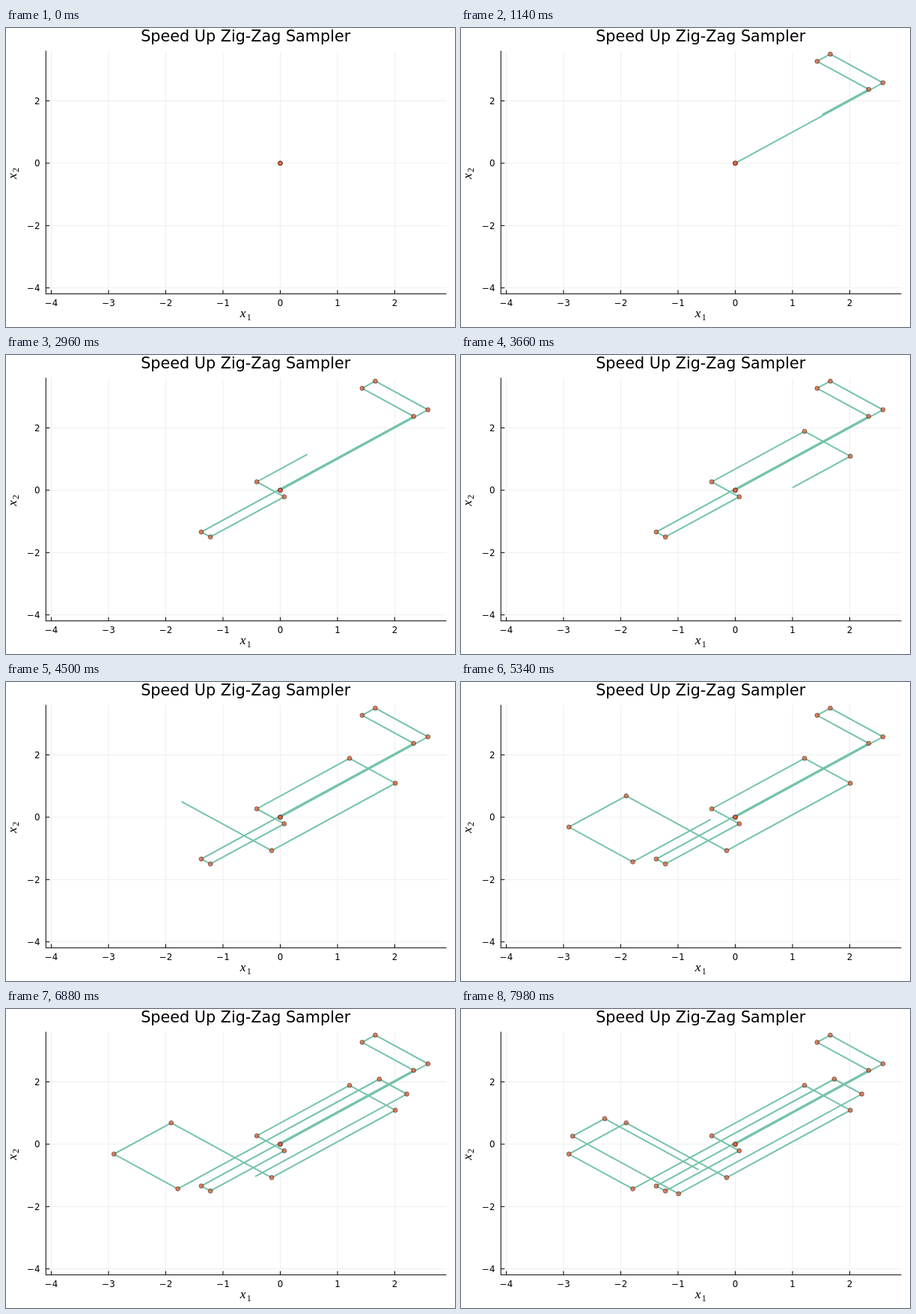
An HTML page with a canvas for the animation above (8000 ms loop, 600 px wide and 400 px high).

```html
<!DOCTYPE html>
<html lang="en">
<head>
<meta charset="utf-8">
<title>Zig-zag sampler</title>
<style>
html, body { margin: 0; width: 100%; height: 100%; overflow: hidden; background: #fff; }
canvas { display: block; }
</style>
</head>
<body>
<canvas id="stage" width="600" height="400"></canvas>
<script>
const ctx = document.getElementById('stage').getContext('2d');
const LOOP = 8000;
const TIME_PER_STEP = 0.0994;
const SANS = '"DejaVu Sans", sans-serif';
const MATH = '"Liberation Serif", serif';
const LEFT = 53.3, RIGHT = 588.5, TOP = 31, BOTTOM = 355.7;
const toX = u => 366.5 + 76.5 * u;
const toY = v => 180.9 - 41.7 * v;

// Signed run lengths, alternately along the rising and the falling diagonal.
const runs = [2.58, -0.92, -0.23, 0.9, -3.71, 0.16, 1.29, -0.48, 1.62, 0.8,
  -2.16, -1.755, -1, 1.115, 3.52, 0.48, -3.2, -1.85, 0.56, 1.8];

// The sampler moves at speed sqrt(1 + |x|^2), so each run's duration is an asinh difference.
function buildTurns() {
  const pos = [0, 0];
  let time = 0;
  const turn = () => ({ time, x: toX(pos[0] + pos[1]), y: toY(pos[0] - pos[1]) });
  const turns = [turn()];
  runs.forEach((length, i) => {
    const along = i % 2, across = pos[1 - along];
    const scale = Math.SQRT2 / Math.sqrt(1 + 2 * across * across);
    const before = Math.asinh(pos[along] * scale);
    pos[along] += length;
    time += Math.abs(Math.asinh(pos[along] * scale) - before) / Math.SQRT2;
    turns.push(turn());
  });
  return turns;
}
const turns = buildTurns();

// Steps are shown for 20, 100 and 20 ms in turn.
function stepAt(ms) {
  const phase = ms % 140;
  return 3 * Math.floor(ms / 140) + (phase < 20 ? 0 : phase < 120 ? 1 : 2);
}

function line(points, color, width) {
  ctx.beginPath();
  points.forEach(({ x, y }) => ctx.lineTo(x, y));
  ctx.strokeStyle = color;
  ctx.lineWidth = width;
  ctx.stroke();
}

const horizontal = (y, x1, x2, color) => line([{ x: x1, y }, { x: x2, y }], color, 1);
const vertical = (x, y1, y2, color) => line([{ x, y: y1 }, { x, y: y2 }], color, 1);

function text(str, x, y, font, align) {
  ctx.font = font;
  ctx.textAlign = align;
  ctx.fillStyle = '#000';
  ctx.fillText(str, x, y);
}

function mathLabel(sub, x, y, angle) {
  ctx.save();
  ctx.translate(x, y);
  ctx.rotate(angle);
  text('x', 0, 0, 'italic 17.5px ' + MATH, 'left');
  text(sub, 9, 3.5, '12px ' + MATH, 'left');
  ctx.restore();
}

function drawAxes() {
  const label = n => String(n).replace('-', '\u2212');
  const font = '11.85px ' + SANS;
  for (let u = -4; u <= 2; u++) {
    vertical(toX(u), TOP, BOTTOM, '#eee');
    vertical(toX(u), BOTTOM, BOTTOM - 5, '#000');
    text(label(u), toX(u), 371.5, font, 'center');
  }
  for (let v = -4; v <= 2; v += 2) {
    horizontal(toY(v), LEFT, RIGHT, '#eee');
    horizontal(toY(v), LEFT, LEFT + 5, '#000');
    text(label(v), 45.5, toY(v) + 4.3, font, 'right');
  }
  vertical(LEFT, TOP - 0.5, BOTTOM + 0.5, '#000');
  horizontal(BOTTOM, LEFT, RIGHT, '#000');
  text('Speed Up Zig-Zag Sampler', 320.2, 18, '20.74px ' + SANS, 'center');
  mathLabel('1', 312.7, 387, 0);
  mathLabel('2', 13.5, 202, -Math.PI / 2);
}

function dot({ x, y }) {
  ctx.beginPath();
  ctx.arc(x, y, 2.9, 0, 2 * Math.PI);
  ctx.fillStyle = 'rgba(227, 95, 55, 0.75)';
  ctx.fill();
  ctx.strokeStyle = 'rgba(0, 0, 0, 0.6)';
  ctx.lineWidth = 0.8;
  ctx.stroke();
}

function drawPath(step) {
  const time = step * TIME_PER_STEP;
  const reached = turns.filter(t => t.time <= time);
  const from = reached[reached.length - 1], to = turns[reached.length];
  const k = (time - from.time) / (to.time - from.time);
  const tip = { x: from.x + k * (to.x - from.x), y: from.y + k * (to.y - from.y) };
  line([...reached, tip], '#75c3aa', 2);
  reached.forEach(dot);
  dot(turns[0]);
}

const start = performance.now();
function frame() {
  ctx.clearRect(0, 0, 600, 400);
  drawAxes();
  drawPath(stepAt((performance.now() - start) % LOOP));
  requestAnimationFrame(frame);
}
frame();
</script>
</body>
</html>
```
